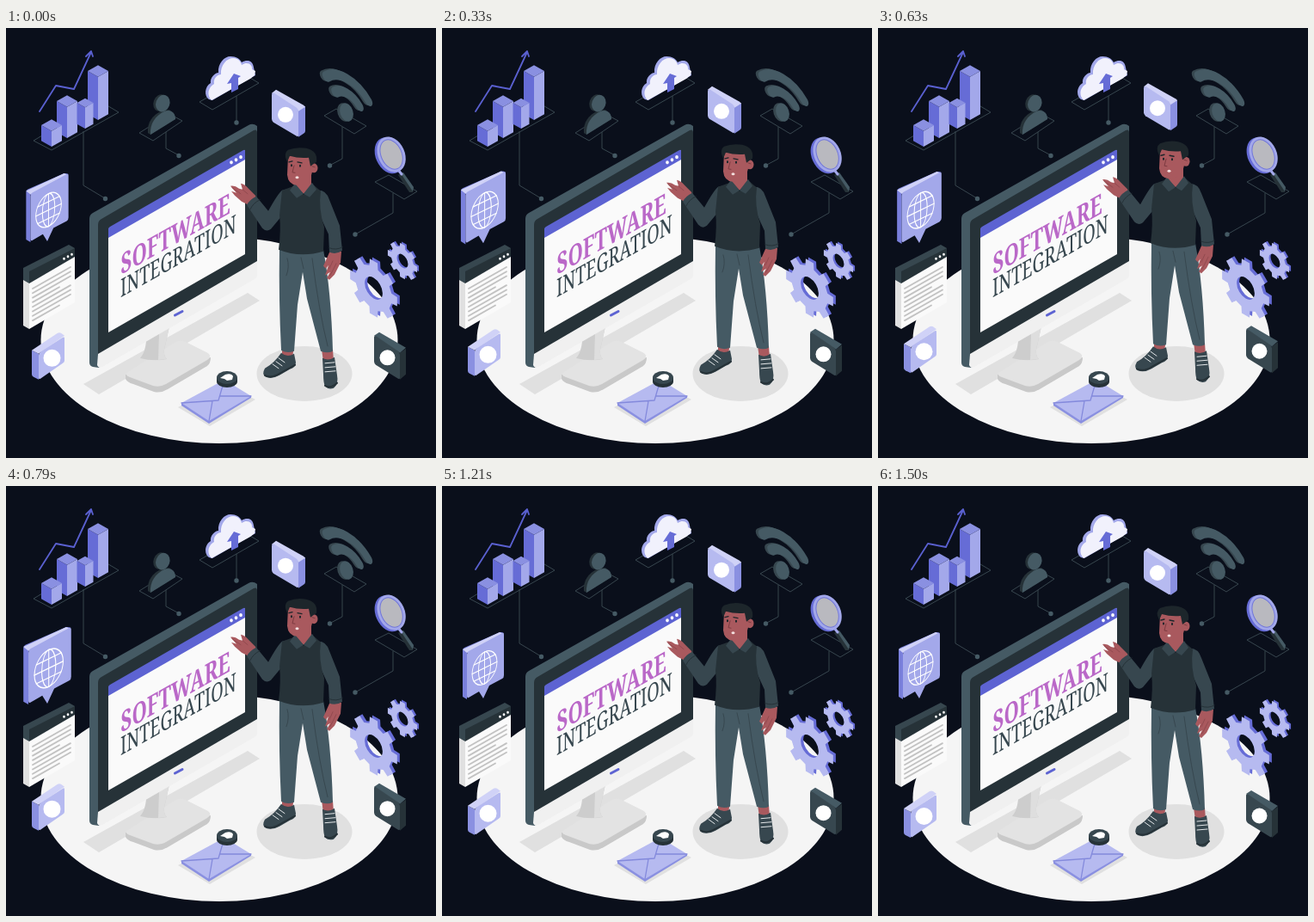
Recreate the animation shown at these times as an HTML page. Size 500 by 500 pixels, loop 1540 ms.

```html
<!DOCTYPE html>
<html lang="en">
<head>
<meta charset="utf-8">
<title>Software integration</title>
<style>
  html, body { margin: 0; width: 100%; height: 100%; overflow: hidden; background: #0a0f1b; }
  svg { display: block; width: 100vw; height: 100vh; }
  text { font-family: "Noto Serif", serif; }
  .wire { fill: none; stroke: #3d4c54; stroke-width: .9; }
  .line { fill: none; stroke-linecap: round; stroke-linejoin: round; }
  .ink { fill: #263238; } .slate { fill: #37474f; } .steel { fill: #455a64; }
  .deep { fill: #666cd6; } .dusk { fill: #8a90e1; } .mid { fill: #a3a8ea; }
  .soft { fill: #b6baf0; } .pale { fill: #d0d2f7; }
  .skin { fill: #a9595e; } .paper { fill: #fafafa; } .shade { fill: #e0e0e0; }
</style>
</head>
<body>
<svg viewBox="0 0 500 500" xmlns="http://www.w3.org/2000/svg">
  <rect width="500" height="500" fill="#0a0f1b"/>
  <ellipse cx="248" cy="363" rx="207.500" ry="120" fill="#f5f5f5"/>

  <!-- platforms and connectors -->
  <path class="wire" d="M32 131 53 142 131 98 109 85ZM90 120V183L115 198
    M155 122 171 131 205 108 190 100ZM186 121V140L201 148
    M225 86 240 95 294 64 279 55ZM268 79V110
    M370 102 405 123 419 114 384 94ZM391 115V152L376 160
    M429 179 463 199 478 190 445 171ZM450 192V215L406 240"/>
  <path class="line" stroke="#455a64" stroke-width="5.4" d="M115.500 198.500h0M201 148.500h0M268 110h0M376.500 160h0M406 240h0"/>

  <!-- bar chart -->
  <g id="bars"></g>
  <path class="line" stroke="#5a60d0" stroke-width="1.8" d="M39 97 58 67 79 71 99 28M93 33 99 27 101 33"/>

  <!-- person icon -->
  <path class="ink" d="M165 122C164 110 170 101 182 96L190 95 197 103V106L168 124Z"/>
  <path class="steel" d="M168 124C167 111 174 102 184 97 192 94 197 99 197 106Z"/>
  <ellipse class="ink" cx="179.500" cy="87" rx="8" ry="10" transform="rotate(20 179 87)"/>
  <ellipse class="steel" cx="182.500" cy="87.500" rx="8" ry="10" transform="rotate(20 182 87)"/>

  <!-- cloud -->
  <path class="mid" d="M236 83C230 79 231 68 238 64 237 58 243 52 247 52 246 41 254 33 261 33 268 33 272 36 274 40 281 36 287 38 288 46L290 55 240 84Z"/>
  <path fill="#f1f1fc" d="M239 84C233 78 235 69 242 65 241 58 246 54 250 54 249 43 257 35 264 35 270 35 273 39 274 43 281 38 287 43 286 48L290 50 289 55 284 59Z"/>
  <path class="deep" d="M257 65 265 53 273 56 270 58V71L262 75V64Z"/>

  <!-- wifi -->
  <g id="wifi" class="line" stroke-width="11"></g>
  <ellipse class="slate" cx="393" cy="98" rx="7.500" ry="11" transform="rotate(-18 393 98)"/>
  <ellipse class="steel" cx="396" cy="98" rx="7.500" ry="11" transform="rotate(-18 396 98)"/>

  <!-- magnifier -->
  <path class="ink" d="M456 171 461 168 474 186 473 191 469 191Z"/>
  <path class="steel" d="M459 169 462 168 474 185 473 190Z"/>
  <path class="line" stroke="#a3a8ea" stroke-width="3" d="M456 165 460 170"/>
  <g transform="rotate(-24 447 147)">
    <ellipse class="deep" cx="445" cy="147.500" rx="15.500" ry="22"/>
    <ellipse class="mid" cx="448" cy="147.500" rx="15.500" ry="21.500"/>
    <ellipse fill="#b9b9bf" stroke="#7277d9" cx="448" cy="147.500" rx="12" ry="18"/>
  </g>

  <g id="gears" fill-rule="evenodd"></g>

  <!-- document -->
  <path class="shade" d="M20 279 27 283V350L20 346Z"/>
  <path class="slate" d="M20 279 73 252 80 256V266L27 297 20 293Z"/>
  <path class="ink" d="M27 283 80 256V266L27 297Z"/>
  <path class="paper" d="M27 297 80 266V319L27 350Z"/>
  <path class="line" stroke="#fff" stroke-width="2.600" d="M67.500 268v.5M72 265.500v.5M76.500 263v.5"/>
  <path id="rows" class="line" stroke="#c2c2c2" stroke-width="1.800"/>

  <!-- monitor -->
  <path class="shade" d="M90 414 281 308 295 317 108 426Z"/>
  <path fill="#c9c9c9" d="M139 403V408Q141 412 148 414L172 423Q180 425 188 420L234 393Q238 390 238 383Z"/>
  <path fill="#e3e3e3" d="M143 399 196 366Q202 362 209 365L233 377Q241 381 234 386L186 414Q179 418 171 416L144 406Q136 403 143 399Z"/>
  <path fill="#cdcdcd" d="M163 364 190 347 184 374Q183 381 187 385 172 388 156 384 162 377 163 364Z"/>
  <path fill="#dedede" d="M178 355 190 347 184 374Q183 381 187 385L177 386Z"/>
  <path class="steel" d="M97 222Q97 217 101 215L282 113Q287 110 292 114V130L108 395 101 394Q97 393 97 389Z"/>
  <path class="ink" d="M107 229Q107 224 111 222L288 119Q292 117 292 122V272L107 380Z"/>
  <path fill="#f0f0f0" d="M107 379 292 271V287Q292 290 289 292L112 394Q107 396 106 392Z"/>
  <path class="paper" d="M119 234 278 142V263L119 354Z"/>
  <path fill="#5d63d2" d="M119 234Q119 232 121 231L276 142Q278 141 278 143V153L119 244Z"/>
  <path class="line" stroke="#fff" stroke-width="3.600" d="M262 156v.6M267.500 153v.6M273 149.800v.6"/>
  <path class="line" stroke="#5d63d2" stroke-width="3" d="M196.500 334 205 329.500"/>
  <text transform="matrix(.67 -.379 0 1 133.500 287)" font-size="33" font-weight="700" fill="#ba68c8">SOFTWARE</text>
  <text transform="matrix(.67 -.379 0 1 133 313.500)" font-size="29.300" fill="#37474f">INTEGRATION</text>

  <!-- envelope and badge -->
  <path class="shade" d="M200 441 254 413 290 432 237 463Z"/>
  <path class="dusk" d="M204 436 285 428V430L236 460 204 439Z"/>
  <path class="soft" d="M204 436 254 409 285 428 236 457Z"/>
  <path class="line" stroke="#8389dc" stroke-width="1.300" d="M204 436 247 433 254 409M236 457 240 434M285 428 249 428"/>
  <path class="ink" d="M245 407V411A12 7 0 0 0 269 411V407Z"/>
  <ellipse class="slate" cx="257" cy="406.500" rx="12" ry="7.500"/>
  <path fill="#fff" d="M249 407 255 403Q262 401 264 405L263 409 257 410 254 408Z"/>

  <!-- globe bubble -->
  <g id="globe">
    <path fill="#7a80dc" d="M24 191Q24 189 26 188L65 171Q68 169 72 171L29 194V248L24 245Z"/>
    <path class="pale" d="M24 190 67 170 72 172 29 194Z"/>
    <path class="mid" d="M29 196Q29 193 31 192L70 171Q72 170 72 173V220Q72 223 70 224L55 232 48 247 43 239 31 246Q29 247 29 244Z"/>
    <g class="line" stroke="#fff" stroke-width="1.200" transform="matrix(.78 -.38 0 1 49.500 211.500)">
      <circle r="18.500"/><ellipse rx="9" ry="18.500"/>
      <path d="M0-18.500V18.500M-18.500 0H18.500M-16-9.500H16M-16 9.500H16"/>
    </g>
  </g>

  <!-- app tiles -->
  <g class="float">
    <path class="dusk" d="M30 375 38 379V409L32 406Q30 405 30 403Z"/>
    <path class="pale" d="M30 375 60 355Q62 354 64 355L68 358 38 379Z"/>
    <path class="soft" d="M38 381Q38 379 40 377L66 360Q68 359 68 361V387Q68 389 66 390L40 408Q38 409 38 407Z"/>
    <circle cx="53.500" cy="384" r="10" fill="#fff"/>
  </g>
  <g class="float">
    <path class="dusk" d="M340 96 348 91V120Q348 122 346 123L340 127Z"/>
    <path class="pale" d="M309 76 314 72 346 90 348 92 340 97Z"/>
    <path class="soft" d="M309 78Q309 75 312 76L338 93Q340 95 340 97V125Q340 127 338 126L311 110Q309 108 309 106Z"/>
    <circle cx="325" cy="101" r="9" fill="#fff"/>
  </g>
  <g class="float">
    <path class="ink" d="M458 378 465 373V403L458 409Z"/>
    <path class="steel" d="M428 358 434 354 465 372 458 378Z"/>
    <path class="slate" d="M428 360Q428 357 431 359L456 376Q458 377 458 380V407Q458 409 456 408L430 392Q428 390 428 388Z"/>
    <circle cx="443.500" cy="383.500" r="9" fill="#fff"/>
  </g>

  <!-- presenter -->
  <ellipse class="shade" cx="347" cy="402" rx="55.500" ry="32"/>
  <g class="float">
    <path class="skin" d="M321 369H335L333 384H321ZM367 374H380L381 388H369Z"/>
    <path class="slate" d="M320 378Q327 384 335 379L337 389Q337 395 330 397L318 404Q309 409 302 406 297 403 301 396 312 390 320 378ZM368 384Q375 388 382 383L385 404Q387 414 381 419 375 421 371 417 369 413 369 403Z"/>
    <path class="line" stroke="#e4e7e9" stroke-width="1" d="M317 384 324 389M314 388 321 393M310 391 317 396M371 390 382 389M371 395 383 394M371 400 383 399"/>
    <path class="line" stroke="#263238" stroke-width="2" d="M301 404Q308 408 318 402L336 392M371 416Q378 420 385 413"/>
    <path class="steel" d="M318 256 369 258Q378 306 380 376 374 379 366 376L350 315 345 284 339 322 335 376Q327 379 320 375 317 316 318 256Z"/>
    <path class="line" stroke="#37474f" stroke-width="1" d="M346 280 343 267M327 268Q330 278 326 288M356 268Q364 330 374 370"/>
    <path class="skin" d="M377 259 390 260 389 273 382 287 376 293 373 291 377 284 371 288 375 276 372 280 369 277Z"/>
    <path class="line" stroke="#8c464c" stroke-width=".8" d="M384 274 377 288M380 271 376 280"/>
    <path class="slate" d="M360 189Q372 187 376 200L388 230 391 259Q384 264 376 261L375 240 361 210Z"/>
    <path class="line" stroke="#263238" stroke-width="1" d="M376 256Q384 259 391 255"/>
    <path class="skin" d="M261 184Q266 183 271 187L275 188 273 181Q278 182 282 187L290 195 292 200 284 207 274 202 266 195 262 190 268 192Z"/>
    <path class="line" stroke="#8c464c" stroke-width=".8" d="M263 186 273 193M275 188 281 193"/>
    <path class="slate" d="M334 186 321 189Q316 193 305 213L291 196Q283 200 280 206L298 233Q303 238 308 234L323 216Z"/>
    <path class="line" stroke="#263238" stroke-width="1" d="M295 200Q287 204 284 211"/>
    <path class="ink" d="M321 189 335 184 346 194 358 183 366 190Q363 210 370 232L369 260Q342 268 317 258 320 235 318 218Z"/>
    <path class="skin" d="M338 178 355 171V184L346 193 337 184Z"/>
    <path class="slate" d="M336 181 346 193 338 198 330 189ZM356 180 361 188 353 197 346 193Z"/>
    <path class="skin" d="M328 149 354 148 357 164 354 175Q347 184 338 183 328 182 327 171Z"/>
    <ellipse class="skin" cx="358" cy="163" rx="4.500" ry="5.500"/>
    <path fill="#1d262b" d="M327 156Q322 146 328 142 338 138 349 140 363 143 361 156L358 158 354 161 352 151Q340 152 330 149Z"/>
    <path class="line" stroke="#1d262b" stroke-width="1.300" d="M329 156 333 155M339 156 344 157"/>
    <path class="line" stroke="#1d262b" stroke-width="2" d="M332 159.500v1M342 160v1"/>
    <path class="line" stroke="#7d3b41" stroke-width="1" d="M335 160 333 168 336 168.500M356 161 359 162"/>
    <ellipse cx="338.500" cy="174" rx="2" ry="1.500" fill="#f3dede"/>
  </g>
</svg>
<script>
  const $ = id => document.getElementById(id);

  // Isometric bar: centre x, top y of the left corner, base y, half width
  const bar = ([x, top, base, w]) => {
    const d = w * .56;
    return `<path class="deep" d="M${x - w} ${top}L${x} ${top + d}V${base}L${x - w} ${base - d}Z"/>
      <path class="mid" d="M${x + w} ${top}L${x} ${top + d}V${base}L${x + w} ${base - d}Z"/>
      <path class="dusk" d="M${x - w} ${top}L${x} ${top - d}L${x + w} ${top}L${x} ${top + d}Z"/>`;
  };
  $('bars').innerHTML = [[107, 50, 107, 12], [71, 85, 128, 12], [92, 87, 117, 9.5], [53, 113, 138, 12]].map(bar).join('');

  // Plane of the upright parts that face left
  const plane = (x, y) => `matrix(.866 .5 0 1 ${x} ${y})`;

  const arc = r => `M${-r * .707} ${-r * .707}A${r} ${r} 0 0 1 ${r * .707} ${-r * .707}`;
  const waves = (x, y, color) => `<path transform="${plane(x, y)}" stroke="${color}" d="${arc(40)}${arc(23)}"/>`;
  $('wifi').innerHTML = waves(394, 98, '#37474f') + waves(397, 99, '#455a64');

  function gearPath(r, hole) {
    const points = [];
    for (let i = 0; i < 8; i++)
      for (const [turn, k] of [[-.3, .77], [-.21, 1], [.21, 1], [.3, .77]]) {
        const a = (i + turn) * Math.PI / 4;
        points.push(`${(Math.cos(a) * r * k).toFixed(2)} ${(Math.sin(a) * r * k).toFixed(2)}`);
      }
    return `M${points.join('L')}ZM${hole} 0A${hole} ${hole} 0 1 0 ${-hole} 0A${hole} ${hole} 0 1 0 ${hole} 0Z`;
  }
  const gear = (x, y, r, hole, depth) => {
    const d = gearPath(r, hole);
    return `<path class="deep" transform="${plane(x + depth, y - depth * .6)}" d="${d}"/>
      <path class="soft" transform="${plane(x, y)}" d="${d}"/>`;
  };
  $('gears').innerHTML = gear(461, 271, 20, 7.5, 2) + gear(427.5, 302.5, 32, 12, 3);

  $('rows').setAttribute('d', Array.from({length: 8}, (_, i) => {
    const y = 303 + i * 5.3, length = i % 4 == 3 ? 31 : 44;
    return `M31 ${y}l${length} ${-length * .57}`;
  }).join(''));

  const LOOP = 1540;
  const floaters = document.querySelectorAll('.float');
  const ramp = (t, from, to) => Math.min(1, Math.max(0, (t - from) / (to - from)));

  function draw() {
    const t = (performance.now() + 15) % LOOP;
    const lift = -9 * (ramp(t, 0, 750) - ramp(t, 750, 1500));
    const beat = ramp(t, 0, 150) - ramp(t, 150, 450) + ramp(t, 600, 750) - ramp(t, 750, 900);
    floaters.forEach(g => g.setAttribute('transform', `translate(0 ${lift})`));
    $('globe').setAttribute('transform', `translate(48 209) scale(${1 + .25 * beat}) translate(-48 -209)`);
    requestAnimationFrame(draw);
  }
  draw();
</script>
</body>
</html>
```
